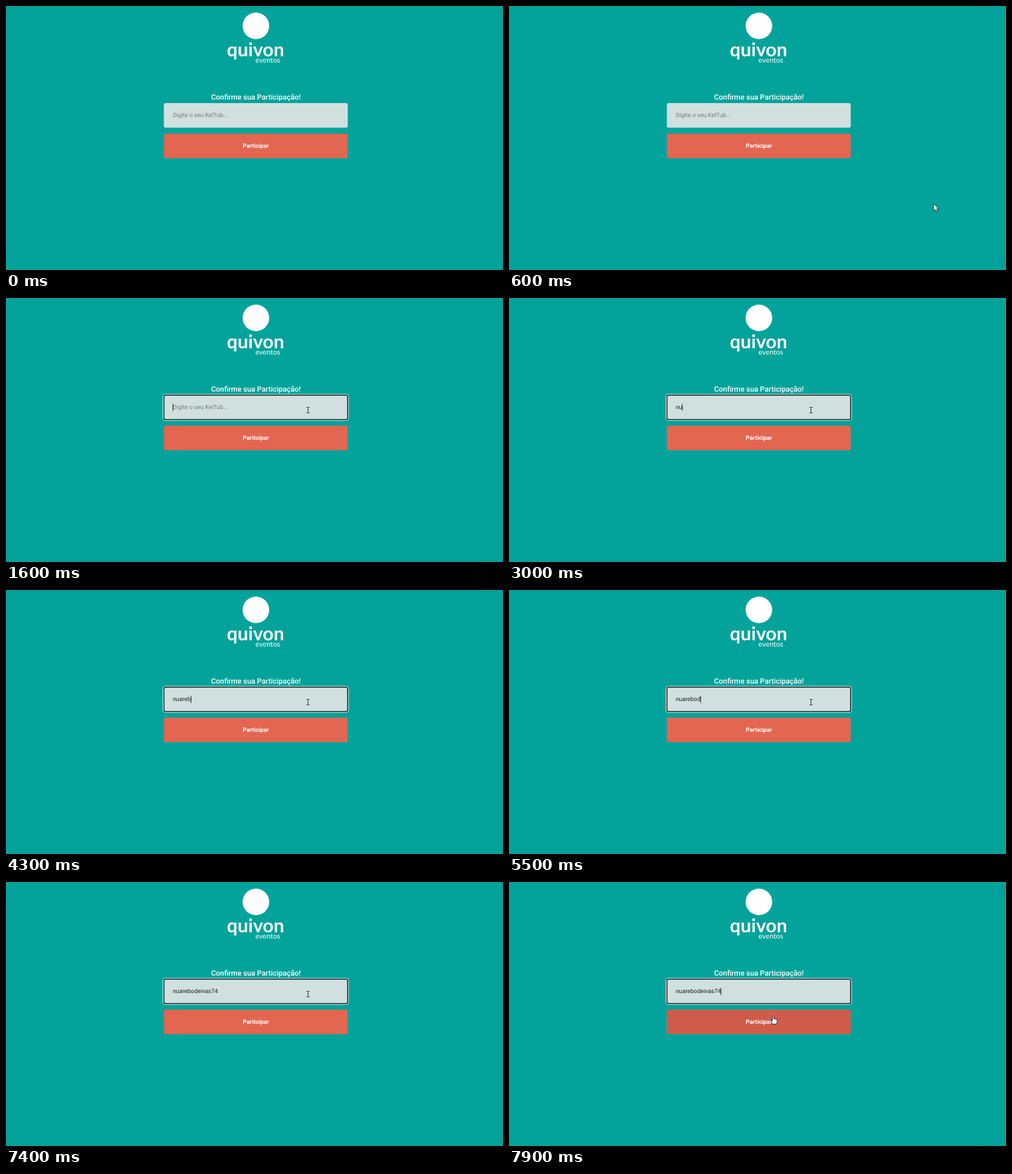
An HTML page that plays this animation: 710 by 378 pixels, repeating every 8000 ms.

```html
<!DOCTYPE html>
<html lang="pt-BR">
<head>
<meta charset="utf-8">
<title>Confirme sua Participação</title>
<style>
  html, body { margin: 0; width: 100%; height: 100%; overflow: hidden; background: #03a39b; }
  svg { display: block; width: 100vw; height: 100vh; }
  text { font: 8.45px Roboto, sans-serif; fill: #fff; text-rendering: geometricPrecision; white-space: pre; }
  .mid { text-anchor: middle; }
  .title { font-size: 10.55px; font-weight: 500; }
  .action { font-weight: 700; }
  .brand { font: 700 27px Lato, sans-serif; }
  .tag { font: 10.3px Lato, sans-serif; }
  #hint { fill: #757b7a; }
  #typed { fill: #1c2423; }
</style>
</head>
<body>
<svg viewBox="0 0 710 378">
  <circle cx="357" cy="28.5" r="19" fill="#fff"/>
  <text class="brand mid" x="356.5" y="72">quivon</text>
  <text class="tag mid" x="374" y="80.6">eventos</text>
  <text class="title mid" x="357" y="133.7">Confirme sua Participação!</text>

  <rect x="225.5" y="139" width="262.7" height="35.2" rx="2.7" fill="#d0e0de"/>
  <g id="focus" fill="none">
    <rect x="224.5" y="138" width="264.7" height="37.2" rx="3.2" stroke="#fff"/>
    <rect x="225.6" y="139.1" width="262.5" height="35" rx="2.4" stroke="#101010" stroke-width="1.3"/>
  </g>
  <text id="hint" x="238.2" y="159.4">Digite o seu KelTub...</text>
  <text id="typed" x="238.2" y="159.4"></text>
  <rect id="caret" y="151.7" width=".8" height="10" fill="#111"/>

  <rect x="225.5" y="182.8" width="262.7" height="35.2" rx="2.7" fill="#e36650"/>
  <rect id="hover" x="225.5" y="182.8" width="262.7" height="35.2" rx="2.7" fill="#cf5c4a"/>
  <text class="action mid" x="357" y="203.3">Participar</text>

  <g id="arrow" class="pointer">
    <path d="M0 0V10.2L2.4 8L4 11.6L5.6 10.9L4 7.4H7.2Z" fill="#fff" stroke="#111" stroke-width=".7"/>
  </g>
  <g id="beam" class="pointer" fill="none">
    <path d="M-2.3 -4H2.3M0 -4V4M-2.3 4H2.3" stroke="#fff" stroke-opacity=".35" stroke-width="2"/>
    <path d="M-2.3 -4H-.5L0 -3.6L.5 -4H2.3M0 -3.6V3.6M-2.3 4H-.5L0 3.6L.5 4H2.3" stroke="#222" stroke-width=".9"/>
  </g>
  <g id="hand" class="pointer">
    <path d="M-1 .8Q0 -.7 1 .8V4.2Q2 3.5 2.7 4.5Q3.8 4 4.3 5Q5.7 4.6 5.8 6V8.4Q5.6 10 4.7 11.6H-.7Q-2 9.5 -3.4 7.2Q-3.2 5.5 -1 7Z"
      fill="#fff" stroke="#111" stroke-width=".8" stroke-linejoin="round"/>
  </g>
</svg>
<script>
const LOOP = 8000, TICK = 100;
const userName = "nuarebodeivas74";
const keyTimes = [2800, 3000, 3300, 3500, 4000, 4300, 4600, 5500, 5600, 6000, 6100, 6400, 6500, 6700, 6800];
const caretOff = [[0, 1600], [2200, 2700], [5100, 5500], [7400, 7900]];
const pointerPath = [ // time, x, y
  [300, 612, 360], [500, 634, 310], [800, 552, 230], [1000, 496, 181], [1100, 463.5, 169.3],
  [1400, 431.5, 160.5], [7500, 431.5, 160.5], [7600, 421, 167], [7800, 385, 188], [7900, 377.3, 191.8]
];

const $ = id => document.getElementById(id);
const show = (el, on) => el.setAttribute("visibility", on ? "visible" : "hidden");
const clamp = v => Math.max(0, Math.min(1, v));

function pointerAt(t) {
  const next = pointerPath.findIndex(p => p[0] >= t);
  if (next < 1) return pointerPath[next < 0 ? pointerPath.length - 1 : 0].slice(1);
  const [a, b] = [pointerPath[next - 1], pointerPath[next]];
  const k = (t - a[0]) / (b[0] - a[0]);
  return [a[1] + (b[1] - a[1]) * k, a[2] + (b[2] - a[2]) * k];
}

function draw(t) {
  const count = keyTimes.filter(k => k <= t).length;
  const typed = $("typed");
  typed.textContent = userName.slice(0, count);
  show($("hint"), !count);
  show($("focus"), t >= 1600);

  show($("caret"), !caretOff.some(([from, to]) => t >= from && t < to));
  $("caret").setAttribute("x", 238 + (count ? typed.getComputedTextLength() : 0));
  $("hover").setAttribute("opacity", clamp((t - 7600) / 200));

  const shape = t < 300 ? "" : t < 1100 ? "arrow" : t < 7700 ? "beam" : "hand";
  for (const el of document.querySelectorAll(".pointer")) {
    show(el, el.id === shape);
    el.setAttribute("transform", `translate(${pointerAt(t)})`);
  }
}

function loop() {
  draw(Math.floor(performance.now() % LOOP / TICK) * TICK);
  requestAnimationFrame(loop);
}
loop();
</script>
</body>
</html>
```
